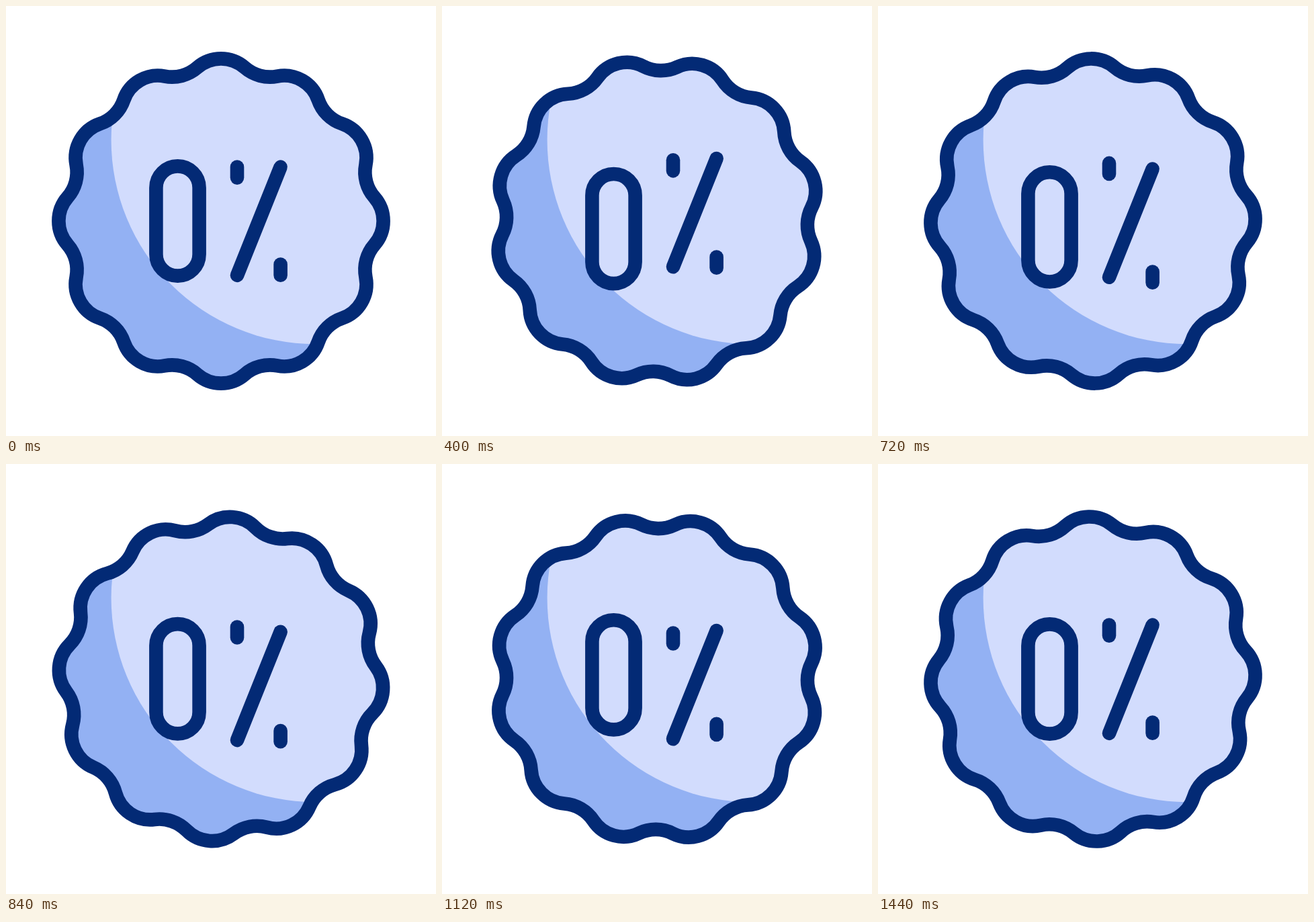
Recreate the animation shown at these times as an HTML page with a canvas. Size 640x640 px, loop 1480 ms.

```html
<!DOCTYPE html>
<html lang="en">
<head>
<meta charset="utf-8">
<title>0% badge</title>
<style>
  html, body { margin: 0; width: 100%; height: 100%; overflow: hidden; background: #fff; }
  canvas { display: block; width: 640px; height: 640px; }
</style>
</head>
<body>
<canvas id="stage" width="640" height="640"></canvas>
<script>
const ctx = document.getElementById('stage').getContext('2d');
const LOOP = 1480, STEP = 40;
const NAVY = '#032a75', LIGHT = '#d2dcfd', SHADE = '#93b1f3';

// Scalloped edge: convex lobe arcs joined by tangent concave arcs.
const LOBES = 12, PITCH = 2 * Math.PI / LOBES;
const LOBE_DIST = 188, LOBE_R = 53.6, VALLEY_DIST = 281;
const vx = VALLEY_DIST * Math.cos(PITCH / 2) - LOBE_DIST;
const vy = VALLEY_DIST * Math.sin(PITCH / 2);
const SWEEP = Math.atan2(vy, vx);
const VALLEY_R = Math.hypot(vx, vy) - LOBE_R;

// Vertical offsets as [time, y] keys, eased in and out between keys.
const MOVES = {
  zero: [[80, 0], [560, 15.6], [1010, -7.7], [1400, 0]],
  upper: [[40, 0], [540, -12.7], [1060, 12.7], [1440, 0]],
  slash: [[40, 0], [420, -12.7], [940, 12.7], [1400, 0]],
  lower: [[40, 0], [330, -12.7], [795, 12.7], [1240, 0]]
};

function offset(keys, t) {
  for (let i = 1; i < keys.length; i++) {
    const [t0, y0] = keys[i - 1], [t1, y1] = keys[i];
    if (t < t1) {
      const u = Math.max(0, (t - t0) / (t1 - t0));
      return y0 + (y1 - y0) * u * u * (3 - 2 * u);
    }
  }
  return 0;
}

function badgePath(turn) {
  const path = new Path2D();
  for (let i = 0; i < LOBES; i++) {
    const a = turn + i * PITCH, v = a + PITCH / 2;
    path.arc(320 + LOBE_DIST * Math.cos(a), 320 + LOBE_DIST * Math.sin(a),
      LOBE_R, a - SWEEP, a + SWEEP);
    path.arc(320 + VALLEY_DIST * Math.cos(v), 320 + VALLEY_DIST * Math.sin(v),
      VALLEY_R, a + SWEEP + Math.PI, a + PITCH - SWEEP + Math.PI, true);
  }
  path.closePath();
  return path;
}

function line(x0, y0, x1, y1, dy) {
  ctx.beginPath();
  ctx.moveTo(x0, y0 + dy);
  ctx.lineTo(x1, y1 + dy);
  ctx.stroke();
}

function capsule(x, top, bottom, r, dy) {
  ctx.beginPath();
  ctx.arc(x, top + r + dy, r, Math.PI, 0);
  ctx.arc(x, bottom - r + dy, r, 0, Math.PI);
  ctx.closePath();
  ctx.stroke();
}

function draw(t) {
  const badge = badgePath(t / LOOP * 2 * PITCH);
  ctx.fillStyle = '#fff';
  ctx.fillRect(0, 0, 640, 640);

  ctx.save();
  ctx.clip(badge);
  ctx.fillStyle = SHADE;
  ctx.fillRect(0, 0, 640, 640);
  ctx.fillStyle = LIGHT;
  ctx.beginPath();
  ctx.arc(460.2, 199.6, 303.6, 0, 2 * Math.PI);
  ctx.fill();
  ctx.restore();

  ctx.strokeStyle = NAVY;
  ctx.lineWidth = 20.6;
  ctx.lineCap = ctx.lineJoin = 'round';
  ctx.stroke(badge);

  capsule(255.5, 238.4, 401.6, 32.1, offset(MOVES.zero, t));
  line(344, 239.6, 344, 255.6, offset(MOVES.upper, t));
  line(408.6, 239.6, 344, 400.8, offset(MOVES.slash, t));
  line(408.6, 384.6, 408.6, 400.8, offset(MOVES.lower, t));
}

const start = performance.now();
function tick() {
  const t = (performance.now() - start) % LOOP;
  draw(Math.floor(t / STEP) * STEP);
  requestAnimationFrame(tick);
}
tick();
</script>
</body>
</html>
```
